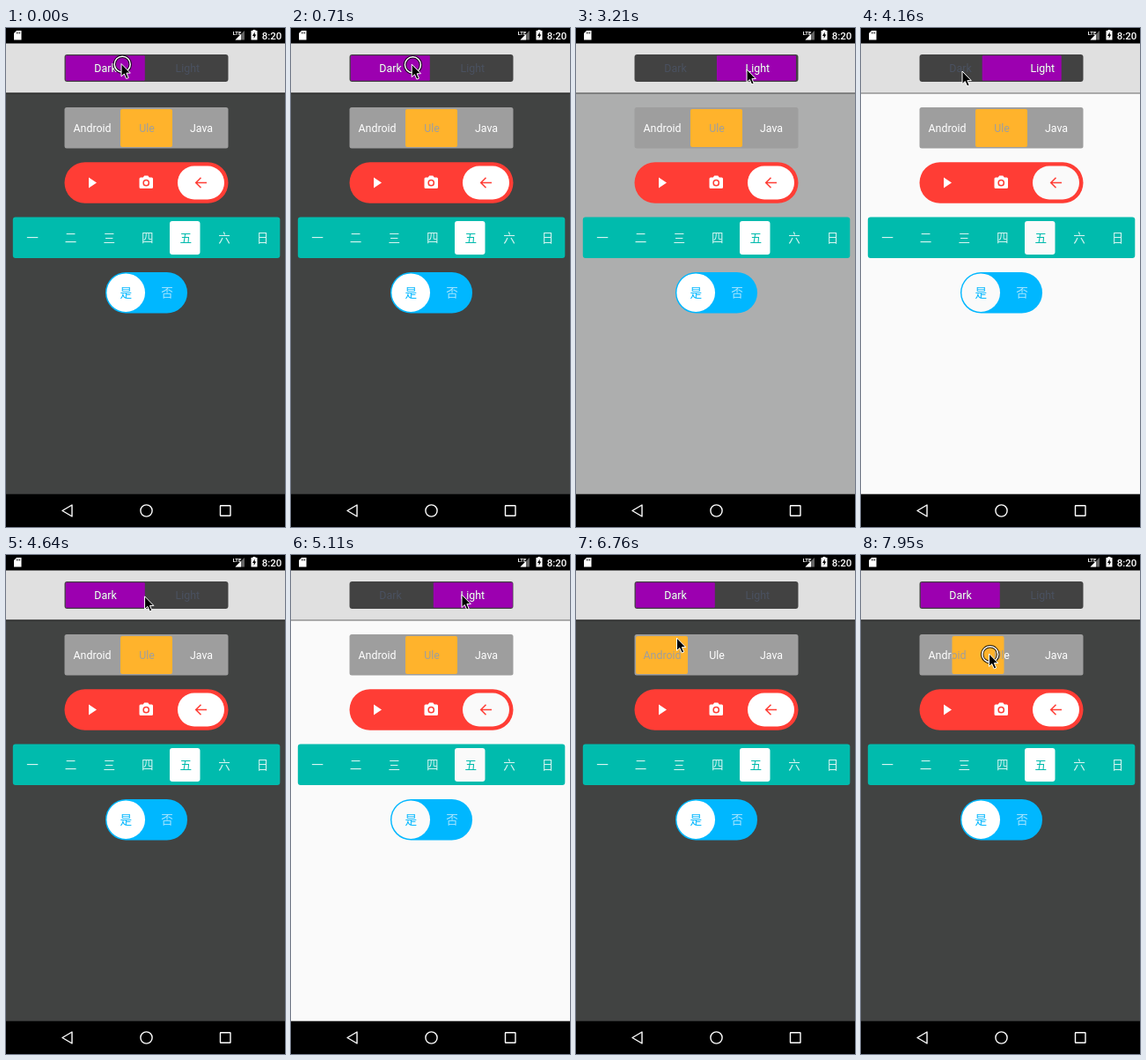
Animation, 317 px wide and 566 px high, one loop 8000 ms. Source, as an HTML page:

```html
<!DOCTYPE html>
<html lang="en">
<head>
<meta charset="utf-8">
<title>Segmented controls</title>
<style>
html, body { margin: 0; width: 100%; height: 100%; overflow: hidden; background: #000; }
svg { display: block; width: 100vw; height: 100vh; }
text { font-family: Roboto, sans-serif; font-size: 12.4px; text-anchor: middle; }
.cjk text { font-family: "Noto Sans CJK SC", "Noto Sans CJK", sans-serif; font-size: 13.6px; }
</style>
</head>
<body>
<svg viewBox="0 0 317 566" preserveAspectRatio="none">
  <defs>
    <clipPath id="themeClip"><rect class="themeBox" y="31.3" width="90" height="28.4" rx="1"/></clipPath>
    <clipPath id="platformClip"><rect class="platformBox" y="92" width="59" height="43" rx="2"/></clipPath>
    <linearGradient id="shade" x2="0" y2="1">
      <stop stop-color="#000" stop-opacity=".6"/>
      <stop offset="1" stop-color="#000" stop-opacity="0"/>
    </linearGradient>
  </defs>

  <rect id="page" y="18" width="317" height="511"/>
  <rect y="17.5" width="317" height="56" fill="#e0e0e0"/>
  <rect y="73.5" width="317" height="2" fill="url(#shade)"/>

  <g fill="#fff">
    <path d="M12 3H17.500V13.500H9V6Z"/>
    <path d="M12.200 4.500V6.500M13.900 4.500V6.500M15.600 4.500V6.500" stroke="#000" stroke-width=".8"/>
    <text x="262.500" y="7.500" style="font-size:6px;font-weight:700">LTE</text>
    <path d="M271 3V13.500H260.500Z" fill="#666"/>
    <path d="M267 7V13.500H260.500Z"/>
    <path d="M280.500 3V2H283.500V3H285.500V13.500H278.500V3Z"/>
    <path d="M282.700 4.500L280 9H281.700V12L284.200 7.600H282.700Z" fill="#000"/>
    <text x="302" y="12.700" style="font-size:11.500px;font-weight:500">8:20</text>
  </g>

  <rect x="66.500" y="30" width="186" height="31" rx="3" fill="#424242"/>
  <rect class="themeBox" y="31.300" width="90" height="28.400" rx="1" fill="#9c00b0"/>
  <g id="theme" fill="#4a5160"></g>
  <g id="themeOn" fill="#fff" clip-path="url(#themeClip)"></g>

  <rect x="66.500" y="90" width="186" height="46.500" rx="2.500" fill="#9e9e9e"/>
  <g id="platform" fill="#fff"></g>
  <rect class="platformBox" y="92" width="59" height="43" rx="2" fill="#ffb32c"/>
  <g id="platformOn" fill="#9e9e9e" clip-path="url(#platformClip)"></g>

  <rect x="66.500" y="152.300" width="186" height="46.500" rx="23.250" fill="#ff3d35"/>
  <rect class="pale" x="195" y="156.500" width="53" height="38" rx="19"/>
  <path d="M94 169.500L103 175.500L94 181.500Z" fill="#fff"/>
  <path d="M153 169.500H155.700L157.200 167.500H161.300L162.800 169.500H165.500Q167 169.500 167 171V180.500Q167 182 165.500 182H153Q151.500 182 151.500 180.500V171Q151.500 169.500 153 169.500Z" fill="#fff"/>
  <circle cx="159.250" cy="175.700" r="3.100" fill="#fff" stroke="#ff3d35" stroke-width="1.500"/>
  <path d="M228 175.500H216M221.500 169.700L215.700 175.500L221.500 181.300" fill="none" stroke="#ff3d35" stroke-width="1.500"/>

  <rect x="7.800" y="214.500" width="303.500" height="46.500" rx="3" fill="#00bbad"/>
  <rect class="pale" x="186" y="219" width="34.500" height="38" rx="3"/>
  <g id="week" class="cjk"></g>

  <rect x="113" y="277" width="93" height="46.500" rx="23.250" fill="#00b7ff"/>
  <circle class="pale" cx="136.200" cy="300.200" r="21.800"/>
  <g id="answer" class="cjk"></g>

  <rect y="528.700" width="317" height="38"/>
  <g fill="none" stroke="#fff" stroke-width="1.400" stroke-linejoin="round">
    <path d="M75 541V554L64 547.500Z"/>
    <circle cx="159.500" cy="547.500" r="6.600"/>
    <rect x="243.500" y="541.800" width="11.500" height="11.500" rx=".5"/>
  </g>

  <g id="pointer">
    <g id="ring" fill="none">
      <circle cx="1.200" cy=".7" r="9" stroke="#000" stroke-opacity=".85" stroke-width="3.400"/>
      <circle cx="1.200" cy=".7" r="9" stroke="#fff" stroke-width="1.500"/>
    </g>
    <path d="M0 0V14.500L3.300 11.500L5.700 17L8.200 16L5.900 10.600H10.300Z" stroke="#fff" stroke-linejoin="round"/>
  </g>
</svg>
<script>
const LOOP = 8000, TICK = 118.7; // the screen refreshes once per tick
const SLOP = 8;                  // finger travel before a drag begins
const SNAP_WAIT = 93, SNAP_TIME = 77, PAGE_LAG = 67;
const $ = id => document.getElementById(id);
const all = name => document.querySelectorAll('.' + name);
const clamp = v => Math.min(1, Math.max(0, v));
const ease = p => p * p * (3 - 2 * p);
const mix = (a, b, p) => a + (b - a) * p;

function labels(id, y, items, color) {
  items.forEach(([word, x], i) => {
    const el = document.createElementNS('http://www.w3.org/2000/svg', 'text');
    el.setAttribute('x', x);
    el.setAttribute('y', y);
    if (color) el.setAttribute('fill', color(i));
    el.textContent = word;
    $(id).append(el);
  });
}

for (const end of ['', 'On']) {
  labels('theme' + end, 50, [['Dark', 113], ['Light', 206.3]]);
  labels('platform' + end, 118, ['Android', 'Ule', 'Java'].map((w, i) => [w, 98 + 62 * i]));
}
const days = [...'一二三四五六日'].map((d, i) => [d, 30 + i * 43.6]);
labels('week', 242.9, days, i => i === 4 ? '#00bbad' : '#d8f5f2');
labels('answer', 304.9, [['是', 136.3], ['否', 183]], i => i ? '#a5e4ff' : '#00b7ff');

const home = { x: 131, y: 40.5 };
const moves = [
  { at: 600, time: 1140, x: 194, y: 47 },
  { at: 3560, time: 240, x: 115, y: 49 },
  { at: 4500, time: 240, x: 194, y: 45 },
  { at: 5220, time: 240, x: 125, y: 45 },
  { at: 6050, time: 240, x: 114.5, y: 94 },
  { at: 6880, time: 240, x: 102, y: 110 },
  { at: 7240, time: 710, x: 145.5, y: 112 },
];
const themeTaps = [4036, 4748, 5816], platformTap = 6528;
const themeDrag = { from: 474, to: 2960 }, platformDrag = { from: 7235, to: LOOP };

function pointerAt(t) {
  let { x, y } = home;
  for (const m of moves) {
    const p = clamp((t - m.at) / m.time);
    x = mix(x, m.x, p);
    y = mix(y, m.y, p);
  }
  return { x, y };
}

const dragged = (t, drag) =>
  Math.max(0, pointerAt(Math.min(t, drag.to)).x - pointerAt(drag.from).x - SLOP);

const snap = (t, tap) => ease(clamp((t - tap - SNAP_WAIT) / SNAP_TIME));

// Dragging acts at once; the snaps that follow are read at their own time.
function themeAt(t, snapTime = t) {
  const v = mix(dragged(t, themeDrag) / 94, 1, snap(snapTime, 3045));
  return themeTaps.reduce((a, tap, i) => mix(a, i % 2, snap(snapTime, tap)), v);
}

function platformAt(t) {
  const x = mix(130, 68, snap(t, platformTap));
  return t < platformDrag.from ? x : x + dragged(t, platformDrag);
}

function isDown(t) {
  const held = [themeDrag, platformDrag].some(d => t >= d.from && t < d.to);
  return held || [0, ...themeTaps, platformTap].some(tap => t > tap - 2 && t < tap + 100);
}

function draw(ms) {
  const t = Math.floor((ms + 8) / TICK) * TICK;
  const light = themeAt(t, t - PAGE_LAG), { x, y } = pointerAt(t);
  const [r, g, b] = [65, 67, 66].map(c => Math.round(mix(c, 250, light)));

  $('page').setAttribute('fill', `rgb(${r},${g},${b})`);
  all('pale').forEach(el => el.setAttribute('fill', light > .99 ? '#fafafa' : '#fff'));
  all('themeBox').forEach(el => el.setAttribute('x', 67.8 + 94 * themeAt(t)));
  all('platformBox').forEach(el => el.setAttribute('x', platformAt(t)));
  $('pointer').setAttribute('transform', `translate(${x} ${y})`);
  $('ring').setAttribute('visibility', isDown(t) ? 'visible' : 'hidden');
}

const start = performance.now();
function frame() {
  draw((performance.now() - start) % LOOP);
  requestAnimationFrame(frame);
}
frame();
</script>
</body>
</html>
```
